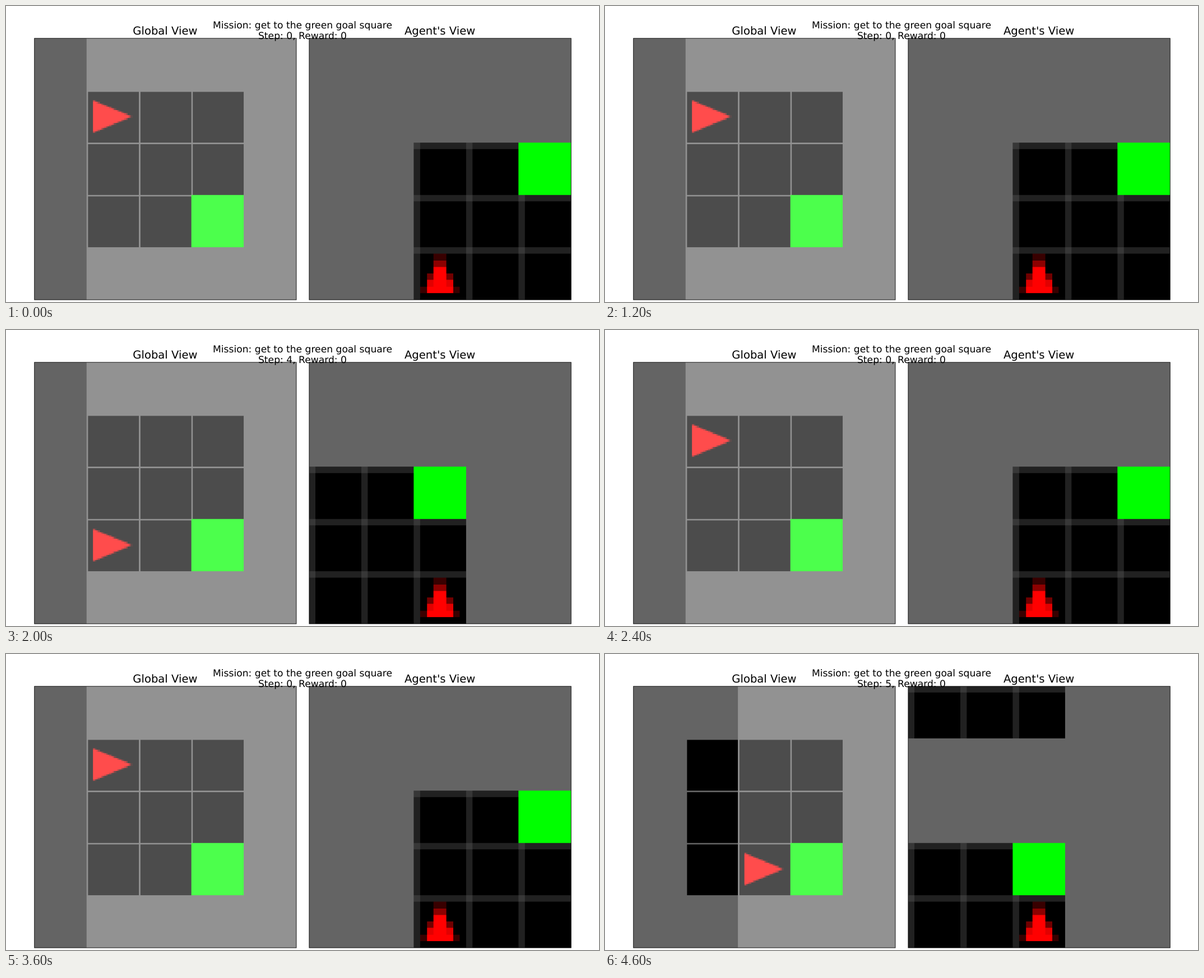
An HTML page with a canvas for the animation above (4.8 s loop, 1058 by 529 pixels).

```html
<!DOCTYPE html>
<html lang="en">
<head>
<meta charset="utf-8">
<title>Grid world agent</title>
<style>
  html, body { margin: 0; width: 100%; height: 100%; overflow: hidden; background: #fff; }
  canvas, svg { position: absolute; left: 0; top: 0; width: 100%; height: 100%; display: block; }
  text { font-family: "DejaVu Sans", sans-serif; text-anchor: middle; text-rendering: geometricPrecision; }
  .title { font-size: 22.22px; }
  .status { font-size: 19.44px; }
</style>
</head>
<body>
<canvas id="panels" width="1200" height="600"></canvas>
<svg viewBox="0 0 1200 600">
  <text class="title" x="322" y="57.5">Global View</text>
  <text class="title" x="878" y="57.5">Agent's View</text>
  <text class="status" x="600" y="45">Mission: get to the green goal square</text>
  <text class="status" x="600" y="67" id="status"></text>
</svg>
<script>
const STEP_MS = 200;
const GRID = 5;
const PANEL = 530;
const TOP = 65;
const LEFT_X = 57;
const RIGHT_X = 613;
const FACING_UP = 3;
const HEADINGS = [[1, 0], [0, 1], [-1, 0], [0, -1]];
const BLACK = [0, 0, 0], GREY = [100, 100, 100], GREEN = [0, 255, 0], RED = [255, 0, 0];

// Agent pose at each step: column, row, heading
const POSES = [[1, 1, 0], [1, 1, 1], [1, 2, 1], [1, 3, 1], [1, 3, 0], [2, 3, 0]];

const ctx = document.getElementById('panels').getContext('2d');
const status = document.getElementById('status');

const wrap = v => (v + 2 * GRID) % GRID;
const isWall = (x, y) => x % (GRID - 1) === 0 || y % (GRID - 1) === 0;
const isGoal = (x, y) => x === 3 && y === 3;

function inAgent(u, v, heading) {
  const [dx, dy] = HEADINGS[heading];
  const along = (u - 0.5) * dx + (v - 0.5) * dy + 0.5;
  const across = (v - 0.5) * dx - (u - 0.5) * dy;
  return along >= 0.12 && Math.abs(across) <= 0.31 * (0.87 - along) / 0.75;
}

function tileColor(x, y, heading, u, v) {
  if (isWall(x, y)) return GREY;
  if (isGoal(x, y)) return GREEN;
  if (heading !== null && inAgent(u, v, heading)) return RED;
  return u < 0.031 || v < 0.031 ? GREY : BLACK;
}

// Colour of one tile pixel, averaged over 3 by 3 samples
function pixelColor(tile, px, py, size) {
  const sum = [0, 0, 0];
  for (let k = 0; k < 9; k++) {
    const u = (px * 3 + k % 3 + 0.5) / (size * 3);
    const v = (py * 3 + Math.floor(k / 3) + 0.5) / (size * 3);
    tileColor(tile.x, tile.y, tile.heading, u, v).forEach((c, i) => sum[i] += c);
  }
  const rgb = sum.map(s => {
    const c = s / 9;
    return Math.floor(tile.lit ? c + 0.3 * (255 - c) : c);
  });
  return `rgb(${rgb})`;
}

function drawPanel(left, size, tileAt) {
  const edge = i => Math.round(i * PANEL / (GRID * size));
  for (let row = 0; row < GRID; row++) {
    for (let col = 0; col < GRID; col++) {
      const tile = tileAt(col, row);
      for (let py = 0; py < size; py++) {
        for (let px = 0; px < size; px++) {
          const i = col * size + px, j = row * size + py;
          ctx.fillStyle = pixelColor(tile, px, py, size);
          ctx.fillRect(left + edge(i), TOP + edge(j), edge(i + 1) - edge(i), edge(j + 1) - edge(j));
        }
      }
    }
  }
  ctx.strokeStyle = '#000';
  ctx.lineWidth = 1;
  ctx.strokeRect(left + 0.5, TOP + 0.5, PANEL, PANEL);
}

function draw(step) {
  const [ax, ay, heading] = POSES[step];
  const [dx, dy] = HEADINGS[heading];
  ctx.clearRect(0, 0, 1200, 600);

  drawPanel(LEFT_X, 32, (x, y) => ({
    x, y,
    heading: x === ax && y === ay ? heading : null,
    lit: (x - ax) * dx + (y - ay) * dy >= 0
  }));

  // The agent sits at the bottom centre and looks up; the world wraps around
  drawPanel(RIGHT_X, 8, (col, row) => {
    const ahead = GRID - 1 - row, side = col - 2;
    return {
      x: wrap(ax + ahead * dx - side * dy),
      y: wrap(ay + ahead * dy + side * dx),
      heading: ahead === 0 && side === 0 ? FACING_UP : null,
      lit: false
    };
  });

  status.textContent = `Step: ${step}, Reward: 0`;
}

let shown = -1;
function tick(now) {
  const step = Math.floor(Math.max(0, now) / STEP_MS) % POSES.length;
  if (step !== shown) draw(shown = step);
  requestAnimationFrame(tick);
}
tick(0);
</script>
</body>
</html>
```
